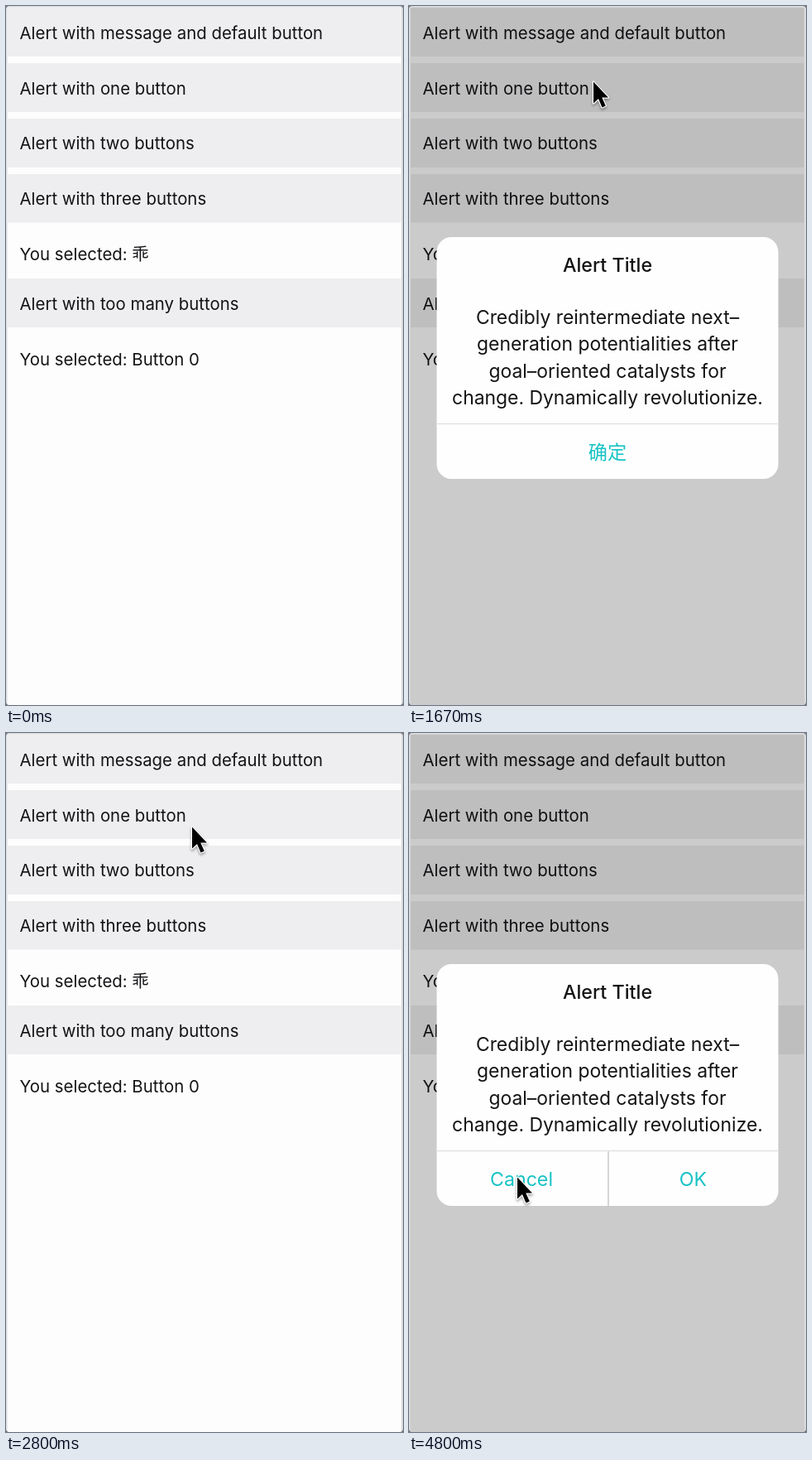
An HTML page for the animation above (4.87 s loop, 480 px wide and 844 px high).

```html
<!DOCTYPE html>
<html lang="en">
<head>
<meta charset="utf-8">
<title>Alert demo</title>
<style>
  html, body { margin: 0; width: 100%; height: 100%; overflow: hidden; background: #6a6a6c; }
  svg { display: block; width: 480px; height: 844px; }
  text {
    font-family: Inter, "Noto Sans CJK SC", "Noto Sans CJK", sans-serif;
    font-optical-sizing: none;
    fill: #141416;
  }
  .list text { font-size: 20.4px; }
  .alert text { font-size: 22.9px; text-anchor: middle; }
  .alert .title { font-size: 23.3px; font-weight: 500; }
  .alert .action { font-size: 23.2px; fill: #18c3c5; }
  .alert .strong { font-weight: 500; }
</style>
</head>
<body>
<svg viewBox="0 0 480 844">
  <rect width="480" height="844" rx="4" fill="#dcdbdd"/>
  <rect x="1.5" y="1.5" width="476.5" height="842.5" rx="2" fill="#fefdfe"/>
  <g class="list" id="list"></g>
  <g class="alert" id="alert" visibility="hidden">
    <rect x="1.5" y="1.5" width="476.5" height="842.5" rx="2" fill="#000" fill-opacity=".2"/>
    <rect x="33.5" y="279" width="413" height="292" rx="18" fill="#fefefe"/>
    <text class="title" x="240" y="321">Alert Title</text>
    <text x="240" y="384">Credibly reintermediate next–</text>
    <text x="240" y="416.3">generation potentialities after</text>
    <text x="240" y="449">goal–oriented catalysts for</text>
    <text x="240" y="481.3">change. Dynamically revolutionize.</text>
    <path d="M33.5 504.5H446.5" stroke="#e2e1e5" stroke-width="1.5"/>
    <g id="single">
      <text class="action strong" x="240" y="546.5">确定</text>
    </g>
    <g id="pair">
      <path d="M241 505V571" stroke="#d6d5d9" stroke-width="2"/>
      <text class="action" x="136" y="546.5">Cancel</text>
      <text class="action" x="343.5" y="546.5">OK</text>
    </g>
  </g>
  <g id="cursor" visibility="hidden">
    <path id="arrow" d="M1 1.500V27.500L7 22L11.500 32.500L15.800 30.500L11.300 20.500H19Z"
      fill="#000" stroke="#fff" stroke-width="2.400" stroke-linejoin="round" paint-order="stroke"
      style="filter: drop-shadow(0 2px 1.500px rgba(0,0,0,.35))"/>
  </g>
</svg>
<script>
const LOOP = 4870, STEP = 1000 / 15;
const $ = id => document.getElementById(id);

// label, baseline, top and bottom of the grey row (if any)
const rows = [
  ['Alert with message and default button', 39.8, 1.5, 61],
  ['Alert with one button', 107, 69, 128],
  ['Alert with two buttons', 172.5, 136, 195],
  ['Alert with three buttons', 239.5, 203, 261.5],
  ['You selected: 乖', 307],
  ['Alert with too many buttons', 366.5, 329, 388],
  ['You selected: Button 0', 434]
];
$('list').innerHTML = rows.map(([label, y, top, bottom]) =>
  (bottom ? `<rect x="1.5" y="${top}" width="476" height="${bottom - top}" fill="#eeedef"/>` : '') +
  `<text x="16.500" y="${y}">${label}</text>`).join('');

// pointer tip: step, x, y
const path = [
  [8, 232, -40], [10, 195, 25], [11, 160, 60], [12, 153, 65], [14, 212, 40],
  [15, 212, 40], [20, 229, 25], [23, 229, 25], [25, 222, 90], [28, 285, 380],
  [29, 292, 500], [31, 266, 531], [35, 266, 531], [38, 246, 230], [39, 241, 112],
  [42, 224, 112], [45, 224, 112], [50, 183, 157], [53, 183, 157], [55, 210, 172],
  [57, 254, 203], [59, 240, 360], [61, 180, 480], [63, 104, 530], [65, 115, 535],
  [68, 337, 534], [69, 337, 535], [71, 119, 535], [72, 130, 535]
];

function tipAt(step) {
  const i = path.findIndex(p => p[0] >= step);
  if (i < 1) return path[i ? path.length - 1 : 0].slice(1);
  const [s0, x0, y0] = path[i - 1], [s1, x1, y1] = path[i];
  const k = (step - s0) / (s1 - s0);
  return [x0 + (x1 - x0) * k, y0 + (y1 - y0) * k];
}

const show = (id, on) => $(id).setAttribute('visibility', on ? 'visible' : 'hidden');

function draw(ms) {
  const step = Math.floor((ms + 4) / STEP);
  const one = step >= 23 && step < 35, two = step >= 53;
  show('alert', one || two);
  show('single', one);
  show('pair', two);
  show('cursor', step >= 9);
  $('cursor').setAttribute('transform', `translate(${tipAt(step)})`);
}

const start = performance.now();
function tick() {
  draw((performance.now() - start) % LOOP);
  requestAnimationFrame(tick);
}
tick();
</script>
</body>
</html>
```
